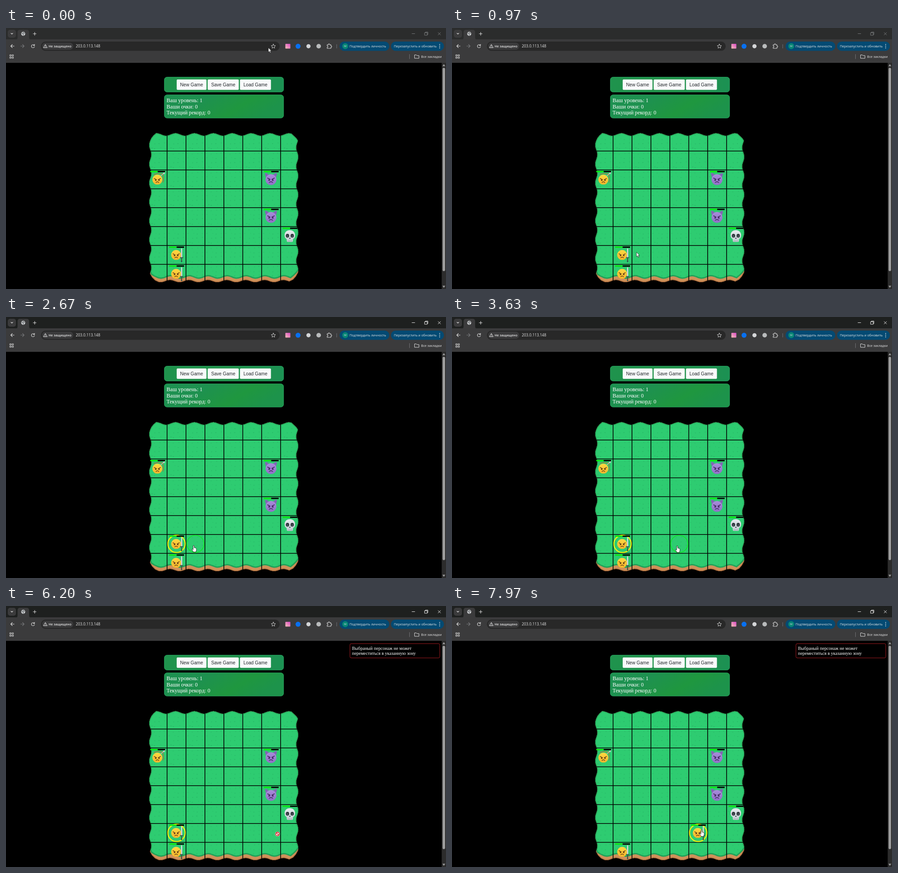
An HTML page for the animation above (8 s loop, 971x577 px).

```html
<!DOCTYPE html>
<html lang="ru">
<head>
<meta charset="utf-8">
<title>Board game</title>
<style>
html, body { margin: 0; width: 100%; height: 100%; overflow: hidden; background: #000; }
svg { display: block; width: 100vw; height: 100vh; }
.ui { font-family: "Open Sans", "Noto Sans", sans-serif; font-size: 7.2px; fill: #e6e6e6; }
.serif { font-family: "Liberation Serif", "Times New Roman", serif; fill: #fff; }
.btn { font-family: "Liberation Sans", Arial, sans-serif; font-size: 10.12px; fill: #212529; }
.line { fill: none; stroke: #dcdcdc; stroke-width: 1.1; stroke-linecap: round; stroke-linejoin: round; }
</style>
</head>
<body>
<svg viewBox="0 0 971 577" preserveAspectRatio="none">
  <defs>
    <linearGradient id="panelA"><stop offset="0" stop-color="#1f934d"/><stop offset=".5" stop-color="#219149"/><stop offset="1" stop-color="#1c9153"/></linearGradient>
    <linearGradient id="panelB" x2="1" y2=".3"><stop offset="0" stop-color="#1d9151"/><stop offset=".35" stop-color="#1e9150"/><stop offset=".72" stop-color="#1f973f"/><stop offset="1" stop-color="#1d934b"/></linearGradient>
    <linearGradient id="pink" x1="1" y1="0" x2="0" y2="1"><stop offset="0" stop-color="#d847c8"/><stop offset="1" stop-color="#f9c3b4"/></linearGradient>
    <linearGradient id="gold" x2="0" y2="1"><stop offset="0" stop-color="#ffd842"/><stop offset="1" stop-color="#f9b62c"/></linearGradient>
    <linearGradient id="violet" x2="0" y2="1"><stop offset="0" stop-color="#a98bdb"/><stop offset="1" stop-color="#8f70c6"/></linearGradient>
    <linearGradient id="bone" x2="0" y2="1"><stop offset="0" stop-color="#e6eaee"/><stop offset="1" stop-color="#c3ccd3"/></linearGradient>
    <pattern id="grass" x="313.75" y="230.2" width="41.75" height="41.75" patternUnits="userSpaceOnUse"><path id="specks" fill="#27b967"/></pattern>
    <clipPath id="land"><path id="landClip"/></clipPath>

    <g id="angry">
      <circle r="10.9" fill="url(#gold)"/>
      <g fill="none" stroke="#5f3a16" stroke-linecap="round" stroke-width="1.4">
        <path d="M-7-2.6L-2 .2M7-2.6L2 .2M-3 6.3Q0 3.4 3 6.3"/>
      </g>
      <circle cx="-3.7" cy="1.3" r="1.6" fill="#5f3a16"/><circle cx="3.7" cy="1.3" r="1.6" fill="#5f3a16"/>
    </g>
    <g id="swordsman">
      <use href="#angry" x="20" y="21"/>
      <path d="M30.6 8L32 5.8L33.5 8V26.5H30.6Z" fill="#b9c3c7"/>
      <path d="M32 6.5V26" stroke="#eef2f2" stroke-width=".8"/>
      <path d="M28.4 27H35.6" stroke="#39474a" stroke-width="1.7"/>
      <path d="M32 28V34.5" stroke="#4a3a35" stroke-width="1.8"/>
      <circle cx="32" cy="35.4" r="1.6" fill="#2d5050"/>
    </g>
    <g id="bowman">
      <path d="M12 11Q20 6 32 9.5Q35 20 32.5 28" fill="none" stroke="#a4703c" stroke-width="1.5"/>
      <path d="M15 25L36 6" stroke="#d9b3ad" stroke-width="1.4"/>
      <path d="M32.5 6.8L37.4 4.8L35.6 10Z" fill="#c4ccce"/>
      <path d="M23 11L30 18" stroke="#df5960" stroke-width="1.1"/>
      <use href="#angry" x="20.3" y="21.5"/>
    </g>
    <g id="devil" transform="translate(20.5 21)">
      <path d="M-12.6-14.5Q-8.5-13.8-5-10.8L-10.5-4.2Q-13.8-8.5-12.6-14.5ZM12.6-14.5Q8.5-13.8 5-10.8L10.5-4.2Q13.8-8.5 12.6-14.5Z" fill="#8264b6"/>
      <circle r="12" cy=".5" fill="url(#violet)"/>
      <path d="M-7.5-3L-2-.2M7.5-3L2-.2M-3.6 6.8Q0 3.6 3.6 6.8" fill="none" stroke="#42285f" stroke-width="1.6" stroke-linecap="round"/>
      <circle cx="-4" cy="1.5" r="1.8" fill="#42285f"/><circle cx="4" cy="1.5" r="1.8" fill="#42285f"/>
    </g>
    <g id="skull" transform="translate(20.4 21)">
      <path d="M0-13C7-13 11.6-8.5 11.6-2C11.6 2 10.4 5 7.2 6.2L6.6 11.3Q6.4 13 4.6 13H-4.6Q-6.4 13-6.6 11.3L-7.2 6.2C-10.4 5-11.6 2-11.6-2C-11.6-8.5-7-13 0-13Z" fill="url(#bone)"/>
      <ellipse cx="-5.2" cy="-.8" rx="3.7" ry="4.2" fill="#30383e"/><ellipse cx="5.2" cy="-.8" rx="3.7" ry="4.2" fill="#30383e"/>
      <circle cx="-5.2" cy=".3" r="1.4" fill="#59666d"/><circle cx="5.2" cy=".3" r="1.4" fill="#59666d"/>
      <path d="M0 3L1.8 6H-1.8Z" fill="#30383e"/>
      <path d="M-3.4 9V13M0 9V13M3.4 9V13" stroke="#84919a" stroke-width=".9"/>
    </g>
    <g id="bar"><path d="M4.6 2.3H21V5.2H4.6Z" fill="#08e80c"/><path d="M21 2.3H37.4V5.2H21Z" fill="#000"/></g>
  </defs>

  <!-- browser chrome -->
  <rect id="strip" width="971" height="26"/>
  <rect y="25" width="971" height="52" fill="#3b3b3c"/>
  <path d="M21 25.5Q25.5 25.5 25.5 21V9.500Q25.500 4 31 4H45.500Q51 4 51 9.500V21Q51 25.500 55.500 25.500Z" fill="#3b3b3c"/>
  <rect x="4" y="4" width="18" height="17.500" rx="5" fill="#3b3b3c"/>
  <path class="line" d="M11 11.500L13 13.500L15 11.500M60 12.800H66.600M63.300 9.500V16.100"/>
  <circle cx="38" cy="12.800" r="4.500" fill="#c8cacc"/>
  <path d="M34.500 11.500Q37 11 37.500 13T39 16.500M38 9.300Q38.300 11.500 41.600 11.400" fill="none" stroke="#55585b" stroke-width="1.300"/>
  <g id="winBtns" fill="none"><path d="M895.500 12.500H902.500M923.700 10.500H929.700V16H923.700ZM925.500 10.200V9H931V14.500H930M953.300 9.700L959.300 15.700M959.300 9.700L953.300 15.700"/></g>

  <path class="line" d="M18 40H10.500M14 36.500L10.500 40L14 43.500"/>
  <path class="line" style="stroke:#77787a" d="M32.500 40H40M36.500 36.500L40 40L36.500 43.500"/>
  <path class="line" d="M62.300 38A3.500 3.500 0 1 0 63 41M63 36V38.600H60.400"/>
  <rect x="77" y="30" width="527" height="20.500" rx="10.250" fill="#282828"/>
  <rect x="79.500" y="32.500" width="69" height="15.500" rx="7.750" fill="#3b3b3c"/>
  <path class="line" d="M87 36.500L91 43.500H83ZM87 39V41M87 42.300V42.400" style="stroke-width:1"/>
  <text class="ui" x="94" y="42.700" font-weight="600" style="font-size:7.100px">Не защищено</text>
  <text class="ui" x="154" y="43.200" style="font-size:8.300px">203.0.113.148</text>
  <path id="star" class="line" style="stroke-width:.9"/>
  <rect x="616.500" y="35" width="11" height="10.500" rx="1" fill="url(#pink)"/>
  <circle cx="644.500" cy="40.300" r="5.500" fill="#0870f0"/>
  <circle cx="667.500" cy="40.300" r="4.600" fill="#d4d6d8"/>
  <circle cx="690" cy="40.300" r="5" fill="#b9bbbc"/>
  <path class="line" d="M708.800 37H711.500Q711 35 712.800 35T714.200 37H717V39.600Q718.800 39.300 718.800 41T717 42.500V45H708.800V42.500Q710.500 42.500 710.500 41T708.800 39.500Z"/>
  <path d="M729.800 36V45M890.500 58V68.500" stroke="#717376"/>
  <rect x="736" y="30" width="110" height="20.500" rx="10.250" fill="#044a73"/>
  <rect x="849.500" y="30" width="117" height="20.500" rx="10.250" fill="#044a73"/>
  <circle cx="748.700" cy="40.200" r="6.600" fill="#078575"/>
  <text class="ui" x="748.700" y="42.300" text-anchor="middle" style="font-size:5.800px">М</text>
  <text class="ui" x="758" y="42.800">Подтвердить личность</text>
  <text class="ui" x="856" y="42.800">Перезапустить и обновить</text>
  <path d="M957 36.500V36.600M957 40.200V40.300M957 43.900V44" stroke="#e6e6e6" stroke-width="1.900" stroke-linecap="round"/>
  <path class="line" d="M8.700 59.200H11.400V61.900H8.700ZM13.700 59.200H16.400V61.900H13.700ZM8.700 64.200H11.400V66.900H8.700ZM13.700 64.200H16.400V66.900H13.700Z" style="stroke-width:1"/>
  <path class="line" d="M902 59.500H905.500L906.800 61H911.300V67H902Z" style="stroke-width:1"/>
  <text class="ui" x="916" y="65.800">Все закладки</text>

  <!-- page -->
  <rect y="77" width="971" height="500" fill="#000"/>
  <rect x="961.500" y="77" width="9.500" height="500" fill="#2c2c2c"/>
  <rect x="963.500" y="88" width="5.500" height="449.500" rx="2.750" fill="#9f9f9f"/>
  <path d="M963.300 84.500L966.300 79.800L969.300 84.500ZM963.300 569.700L966.300 574.400L969.300 569.700Z" fill="#9f9f9f"/>
  <g stroke="#28a45f">
    <rect x="349.400" y="108.600" width="263.200" height="33" rx="6" fill="url(#panelA)"/>
    <rect x="349.400" y="147.800" width="263.200" height="51.300" rx="6" fill="url(#panelB)"/>
  </g>
  <g fill="#f8f9fa">
    <rect x="376.700" y="113.700" width="65.800" height="23" rx="2"/>
    <rect x="445" y="113.700" width="68.700" height="23" rx="2"/>
    <rect x="516.300" y="113.700" width="68.400" height="23" rx="2"/>
  </g>
  <g class="btn" text-anchor="middle">
    <text x="409.600" y="128.800">New Game</text><text x="479.400" y="128.800">Save Game</text><text x="550.400" y="128.800">Load Game</text>
  </g>
  <g class="serif" font-size="12.100">
    <text x="354.300" y="163.700">Ваш уровень: 1</text><text x="354.300" y="177.500">Ваши очки: 0</text><text x="354.300" y="191.300">Текущий рекорд: 0</text>
  </g>
  <g id="note">
    <rect x="759" y="83.200" width="198.300" height="31.600" rx="3" fill="#000" stroke="#a31b20"/>
    <g class="serif" font-size="10.100"><text x="763.500" y="96.500">Выбраный персонаж не может</text><text x="763.500" y="108.200">переместиться в указанную зону</text></g>
  </g>

  <!-- board -->
  <g clip-path="url(#land)">
    <path id="soil" fill="#cf915a" stroke="#a9693a" stroke-width="3"/>
    <path id="turf" fill="#2ecc71" stroke="#23a058" stroke-width="3"/>
    <path id="turfSpecks" fill="url(#grass)"/>
  </g>
  <path id="grid" stroke="#000" stroke-width="1.600"/>
  <circle id="goal" r="19" fill="none" stroke="#10e72c" stroke-width="1.800"/>
  <circle id="picked" r="19.100" fill="none" stroke="#f3f30c" stroke-width="2.300"/>
  <g id="units"></g>

  <path id="arrow" d="M0 0V10L2.300 7.900L3.900 11.600L5.600 10.800L4 7.300H7Z" fill="#fff" stroke="#111" stroke-width=".7"/>
  <path id="hand" d="M-1.200 1Q-1.200 0 0 0T1.200 1V5Q2.300 4.400 3 5.400Q4.200 4.900 4.700 6Q6 5.800 6 7.200V10Q6 11.500 5 13V14.500H-1V13.200L-4 9.300Q-4.300 8 -3 7.900L-1.200 9.300Z" fill="#fff" stroke="#111" stroke-width=".8"/>
  <g id="ban"><circle r="5.200" fill="#fff"/><circle r="3.900" fill="#fff" stroke="#c9151e" stroke-width="1.600"/><path d="M-2.700-2.700L2.700 2.700" stroke="#c9151e" stroke-width="1.600"/></g>
</svg>
<script>
const LOOP = 8000, CELL = 41.75, LEFT = 313.75, TOP = 230.2;
const $ = id => document.getElementById(id);
const set = (id, name, value) => $(id).setAttribute(name, value);
const show = (id, on) => set(id, 'visibility', on ? 'visible' : 'hidden');
const place = (id, x, y) => set(id, 'transform', `translate(${x} ${y})`);
const cellX = col => LEFT + col * CELL;
const cellY = row => TOP + row * CELL;
const wave = (v, peak) => Math.cos(2 * Math.PI * (v - peak) / CELL);
const poly = pts => 'M' + pts.map(p => p[0].toFixed(1) + ' ' + p[1].toFixed(1)).join('L') + 'Z';

function edge(from, to, point) {
  const n = Math.ceil(Math.abs(to - from) / 2), pts = [];
  for (let i = 0; i <= n; i++) pts.push(point(from + (to - from) * i / n));
  return pts;
}

function buildLand() {
  const top = edge(331, 630, x => [x, 235.3 - 2.7 * wave(x, 374)]);
  const right = to => edge(249, to, y => [642.8 + 2.3 * wave(y, 285)  , y]);
  const left = from => edge(from, 249, y => [318.3 - 2.3 * wave(y, 259), y]);
  const base = edge(625, 337, x => [x, 559.7 + 2.4 * wave(x, 341)]);
  const rim = edge(628, 335, x => [x, 550.2 + 2.7 * wave(x, 342)]);
  const outer = poly([...top, [637, 240], [641, 244], ...right(541), [640, 549], [634, 556],
    ...base, [329, 558], [322, 551], ...left(543), [321, 243], [325, 238]]);
  const inner = poly([...top, [637, 240], [641, 244], ...right(534), [640, 541], [634, 547],
    ...rim, [327, 548], [321, 544], ...left(538), [321, 243], [325, 238]]);
  set('soil', 'd', outer);
  set('landClip', 'd', outer);
  set('turf', 'd', inner);
  set('turfSpecks', 'd', inner);
}

function buildGrid() {
  let d = '';
  for (let i = 1; i < 8; i++) d += `M${cellX(i)} 233V562M315.500 ${cellY(i)}H646`;
  set('grid', 'd', d);
}

function buildSpecks() {
  let seed = 11, d = '';
  const rnd = () => (seed = seed * 16807 % 2147483647) / 2147483647;
  for (let i = 0; i < 16; i++) {
    const x = 2 + (i % 4) * 10 + rnd() * 5, y = 3 + (i >> 2) * 10 + rnd() * 4, s = 1 + rnd();
    d += `M${x} ${y}h${2 * s}l${-s} ${s * 1.2}Z`;
  }
  set('specks', 'd', d);
}

function buildStar() {
  const pts = [];
  for (let i = 0; i < 10; i++) {
    const a = i * Math.PI / 5, r = i % 2 ? 2.3 : 5;
    pts.push([590 + r * Math.sin(a), 40.6 - r * Math.cos(a)]);
  }
  set('star', 'd', poly(pts));
}

const units = [['bowman', 0, 2], ['devil', 6, 2], ['devil', 6, 4], ['skull', 7, 5], ['swordsman', 1, 7], ['swordsman', 1, 6, 'hero']];
function buildUnits() {
  $('units').innerHTML = units.map(([kind, col, row, id]) =>
    `<g ${id ? `id="${id}"` : ''} transform="translate(${cellX(col)} ${cellY(row)})"><use href="#${kind}"/><use href="#bar"/></g>`).join('');
}

// pointer stops: time, x, y
const path = [
  [30, 579, 43.5], [600, 567, 430], [930, 567, 430], [970, 407, 495.5],
  [1290, 407, 495.5], [1330, 384, 497], [1530, 384, 497], [1630, 377, 502],
  [2330, 377, 502], [2660, 414, 505], [2770, 416, 506], [2930, 416, 506], [3030, 438, 507],
  [3300, 438, 507], [3630, 497, 506], [3730, 497, 506], [3770, 501, 506],
  [3930, 501, 506], [3970, 521, 506], [4170, 521, 506], [4630, 604, 506], [4930, 599.5, 504],
  [6200, 599.5, 504], [6330, 547.5, 503], [7300, 547.5, 503], [7335, 541, 475],
  [7400, 554, 508], [7630, 554, 508], [7970, 550.5, 495]
];

function pointer(t) {
  if (t <= path[0][0]) return path[0].slice(1);
  for (let i = 1; i < path.length; i++) {
    const a = path[i - 1], b = path[i];
    if (t > b[0]) continue;
    let k = (t - a[0]) / (b[0] - a[0]);
    if (b[0] - a[0] > 300) k = k * k * (3 - 2 * k);
    return [a[1] + (b[1] - a[1]) * k, a[2] + (b[2] - a[2]) * k];
  }
  return path[path.length - 1].slice(1);
}

function draw(t) {
  const [x, y] = pointer(t);
  const active = t >= 2070, moved = t >= 6930;
  const col = Math.floor((x - LEFT) / CELL), heroCol = moved ? 5 : 1;
  const kind = t < 1310 ? 'arrow' : col > 5 ? 'ban' : 'hand';

  set('strip', 'fill', active ? '#1e201f' : '#2b2c2c');
  set('winBtns', 'stroke', active ? '#e8e8e8' : '#77797a');

  place('hero', cellX(heroCol), cellY(6));
  place('picked', cellX(heroCol) + 20.8, cellY(6) + 20.9);
  show('picked', active);
  place('goal', cellX(col) + 20.8, cellY(6) + 20.9);
  show('goal', active && !moved && kind === 'hand' && col !== heroCol);

  set('note', 'opacity', Math.max(0, Math.min(1, (t - 5200) / 170)));
  for (const id of ['arrow', 'hand', 'ban']) show(id, id === kind);
  place(kind, x, y);
}

buildLand();
buildGrid();
buildSpecks();
buildStar();
buildUnits();

const start = performance.now();
function tick() {
  draw((performance.now() - start) % LOOP);
  requestAnimationFrame(tick);
}
draw(0);
requestAnimationFrame(tick);
</script>
</body>
</html>
```
